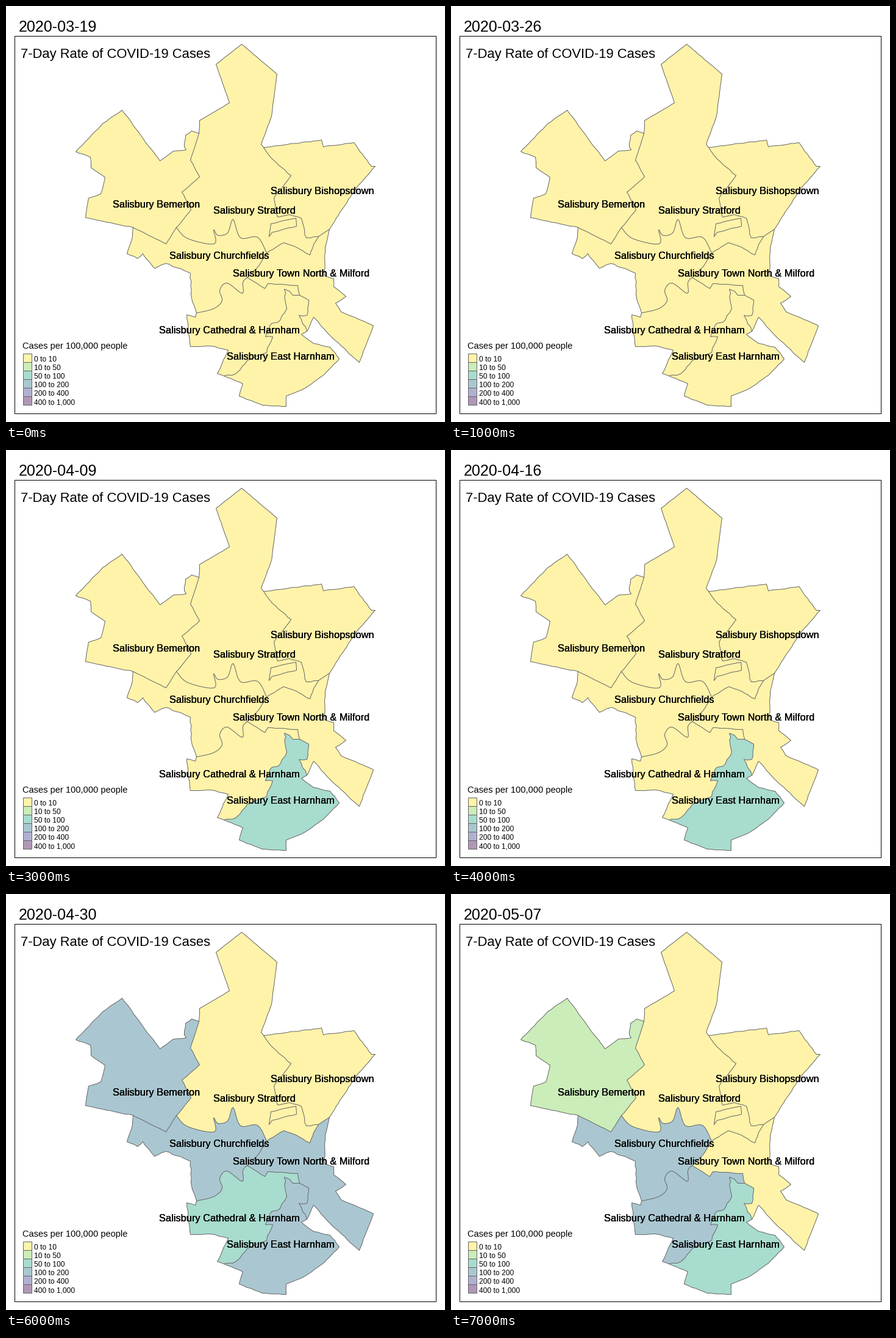
Write a matplotlib script that moves like this. It is 720 px wide and 681 px high and loops after 8000 ms.

```python
import numpy as np
import matplotlib
import matplotlib.pyplot as plt
from matplotlib.animation import FuncAnimation
from matplotlib.patches import Polygon, Rectangle

W, H, DPI = 720, 681, 64
PX = 72 / DPI  # points per pixel
matplotlib.rcParams["font.family"] = "Liberation Sans"
matplotlib.rcParams["path.simplify"] = False

COLORS = ["#FFF3A9", "#CBEDB9", "#A8DCCF", "#AAC7D1", "#B0B1D1", "#B197B7"]
BINS = ["0 to 10", "10 to 50", "50 to 100", "100 to 200", "200 to 400",
        "400 to 1,000"]
EDGE = "#666666"
rng = np.random.default_rng(4)


def rough(*keys, amount=0.6, step=6):
    """Straight runs between key points, broken up by a small random wander."""
    keys = np.array(keys, float)
    points = [keys[:1]]
    for a, b in zip(keys, keys[1:]):
        n = max(1, int(np.hypot(*(b - a)) / step))
        run = a + (b - a) * np.linspace(0, 1, n + 1)[1:, None]
        run[:-1] += rng.uniform(-amount, amount, (n - 1, 2))
        points.append(run)
    return np.vstack(points)


def smooth(*keys, n=5):
    """Catmull-Rom curve through the key points."""
    k = np.array([keys[0], *keys, keys[-1]], float)
    t = np.arange(n)[:, None] / n
    runs = [b + ((c - a) * t + (2 * a - 5 * b + 4 * c - d) * t**2
                 + (3 * b - a - 3 * c + d) * t**3) / 2
            for a, b, c, d in zip(k, k[1:], k[2:], k[3:])]
    return np.vstack(runs + [k[-1:]])


# Points where three areas, or two areas and the outside, meet.
A, B, C, D, E = (316, 208), (422, 231), (279, 362), (208, 362), (312, 502)
F, G, I, J = (395, 444), (481, 473), (493, 532), (357, 605)
Q, T, U = (427, 404), (512, 377), (530, 365)

strat_out = rough(A, (317, 187), (366, 158), (344, 95), (386, 62),
                  (444, 111), (435, 180), (418, 226), B, amount=0.3)
bem_out = rough(A, (304, 204), (294, 211), (292, 230), (295, 235),
                (274, 237), (252, 253), (190, 170), (158, 192), (114, 238),
                (138, 247), (139, 264), (162, 280), (155, 307), (135, 314),
                (130, 346), D)
bem_church = rough(D, (262, 389), C, amount=0.3)
bem_strat = rough(C, (303, 333), (288, 304), (317, 279), (302, 252), A)
strat_bish = rough(B, (436, 250), (467, 277), (453, 296), (439, 314),
                   (445, 345), (464, 341), (484, 347), (492, 379), T,
                   amount=1)
strat_town = rough(T, (504, 390), (498, 407), (470, 392), (455, 387), Q)
strat_church = smooth(Q, (412, 378), (384, 379), (372, 349), (363, 371),
                      (347, 375), (340, 366), (341, 389), (297, 380), C)
bish_out = rough(B, (517, 219), (520, 230), (570, 223), (577, 233),
                 (599, 262), (605, 262), (575, 296), (541, 347), U)
bish_town = rough(U, T)
church_out = rough(D, (205, 385), (198, 405), (215, 413), (224, 405),
                   (243, 429), (262, 421), (302, 437), (304, 478), E,
                   amount=1)
church_cath = smooth(E, (340, 495), (354, 482), (350, 465), (362, 453),
                     (387, 470), (388, 452), F)
church_town = rough(F, (414, 425), Q)
town_cath = rough(F, (424, 462), (429, 454), (478, 457), G)
town_east = rough(G, (496, 481), (493, 506), (480, 506), I, amount=1)
town_out = rough(U, (523, 395), (522, 441), (537, 446), (537, 459),
                 (557, 475), (540, 486), (549, 500), (602, 523), (579, 583),
                 (535, 543), (504, 509), I)
cath_east = rough(G, (470, 473), (456, 463), (460, 495), (449, 514),
                  (432, 523), (425, 541), (437, 541), (427, 567),
                  (395, 580), (377, 601), J, amount=2)
cath_out = rough(E, (310, 509), (296, 505), (302, 557), (335, 556),
                 (364, 563), (346, 601), J)
east_out = rough(I, (484, 537), (504, 552), (531, 558), (546, 577),
                 (520, 604), (490, 625), (459, 638), (459, 655), (420, 653),
                 (382, 638), (388, 618), J)
bish_strip = rough((434, 356), (475, 347), (476, 360), (436, 370),
                   (431, 377), (434, 356))


def ring(*borders):
    """Join borders end to end, turning each one as needed."""
    points = borders[0]
    for border in borders[1:]:
        turn = not np.array_equal(border[0], points[-1])
        points = np.vstack([points, border[::-1] if turn else border])
    return points


# Outline, label, label centre and label baseline.
REGIONS = [
    (ring(bem_out, bem_church, bem_strat), "Bemerton", 247, 330),
    (ring(strat_out, strat_bish, strat_town, strat_church, bem_strat),
     "Stratford", 407, 340),
    (ring(bish_out, bish_town, strat_bish), "Bishopsdown", 519, 308),
    (ring(church_out, church_cath, church_town, strat_church, bem_church),
     "Churchfields", 350, 414),
    (ring(town_out, town_east, town_cath, church_town, strat_town,
          bish_town), "Town North & Milford", 484, 443),
    (ring(cath_out, cath_east, town_cath, church_cath),
     "Cathedral & Harnham", 366, 536),
    (ring(east_out, cath_east, town_east), "East Harnham", 450, 579),
]
BORDERS = [strat_out, bem_out, bem_church, bem_strat, strat_bish, strat_town,
           strat_church, bish_out, bish_town, church_out, church_cath,
           church_town, town_cath, town_east, town_out, cath_east, cath_out,
           east_out, bish_strip]

# One row per week, one class digit per region.
WEEKS = ["0000000", "0000000", "0000200", "0000002",
         "0000002", "0010233", "3003323", "1003032"]
START = np.datetime64("2020-03-19")

fig = plt.figure(figsize=(W / DPI, H / DPI), dpi=DPI, facecolor="white")
ax = fig.add_axes([0, 0, 1, 1])
ax.set(xlim=(0, W), ylim=(H, 0))
ax.axis("off")


def area(points):
    return ax.add_patch(Polygon(points + 0.5, lw=0))


def box(x, y, w, h, fill, edge):
    ax.add_patch(Rectangle((x + 0.5, y + 0.5), w, h, fc=fill, ec=edge,
                           lw=PX, snap=False))


def text(x, y, s, size, ha="left"):
    return ax.text(x, y, s, fontsize=size * PX, ha=ha, va="baseline")


box(14, 49, 691, 618, "none", "black")
areas = [[area(points)] for points, *_ in REGIONS]
areas[2].append(area(bish_strip))
for border in BORDERS:
    ax.plot(*(border + 0.5).T, color=EDGE, lw=PX, solid_joinstyle="round",
            snap=False)

# Labels are overprinted, which hardens their edges.
for _, name, x, y in REGIONS:
    for _ in range(3):
        text(x, y, "Salisbury " + name, 16.35, "center")

date = text(21, 42, "", 25)
text(24, 85, "7-Day Rate of COVID-19 Cases", 22)
text(27, 561, "Cases per 100,000 people", 14.6)
for i, (color, label) in enumerate(zip(COLORS, BINS)):
    box(28, 569 + 14 * i, 14, 14, color, EDGE)
    text(46, 582 + 14 * i, label, 12)


def update(week):
    date.set_text(str(START + 7 * week))
    for patches, level in zip(areas, WEEKS[week]):
        for patch in patches:
            patch.set_facecolor(COLORS[int(level)])
    return [date]


anim = FuncAnimation(fig, update, frames=len(WEEKS), interval=1000,
                     repeat=True, repeat_delay=0, blit=False)
plt.show()
```
